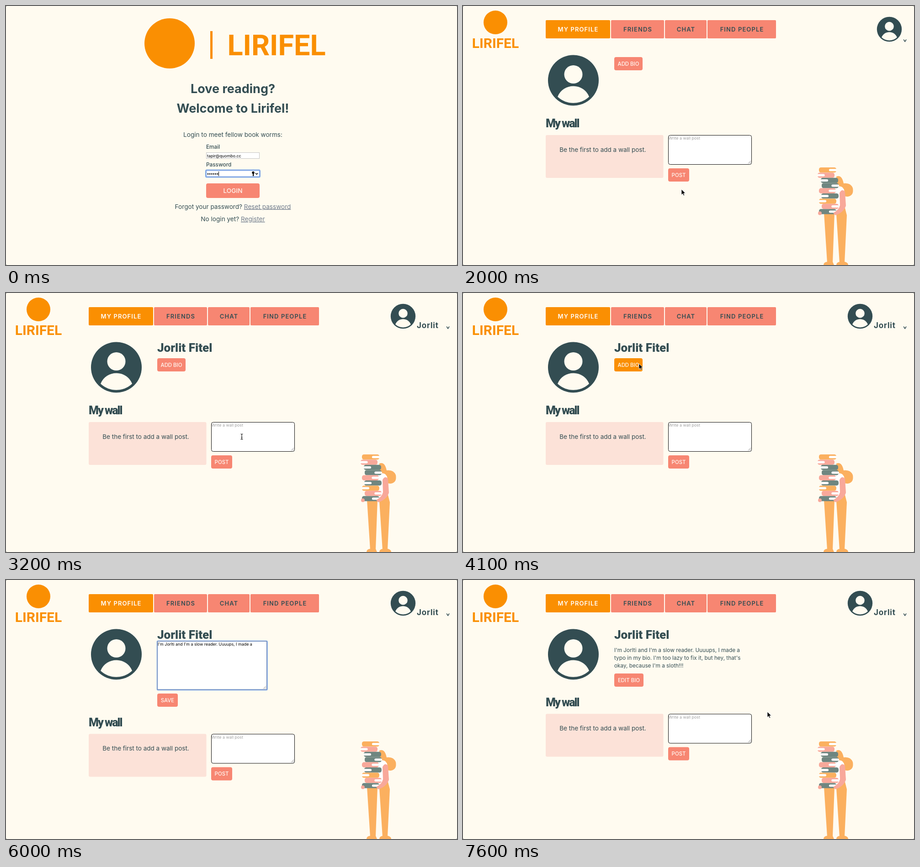
An HTML page that plays this animation: 987x568 px, repeating every 7.7 s.

```html
<!DOCTYPE html>
<html lang="en">
<head>
<meta charset="utf-8">
<title>Lirifel</title>
<style>
  html, body { margin: 0; width: 100%; height: 100%; overflow: hidden; background: #555; }
  svg { display: block; width: 987px; height: 568px; font: 13.6px Inter, sans-serif; fill: #334d52; }
  text { white-space: pre; }
  .mid { text-anchor: middle; }
  .brand { font-family: Roboto, sans-serif; font-weight: 700; fill: #fa8f02; text-anchor: middle; }
  .head { font: 900 26px Roboto, sans-serif; }
  .title { font-weight: 700; font-size: 27px; }
  .label { font-weight: 500; font-size: 11.8px; }
  .field { font-size: 8.9px; fill: #000; }
  .hint { font-size: 8.9px; fill: #a0a0a0; }
  .nav { font-weight: 600; font-size: 13px; letter-spacing: 1.1px; }
  .bio { font-size: 11.8px; }
  .link { fill: #717d8d; text-decoration: underline; }
</style>
</head>
<body>
<svg id="stage" viewBox="0 0 987 568"></svg>
<script>
const LOOP = 7700, STEP = 100;
const CREAM = '#fffbf0', DARK = '#334d52', CORAL = '#f78672', ORANGE = '#fa8f02', GREY = '#717e90';
const SAND = '#fbb05f', PINK = '#f8a89a', SLATE = '#6f8680', RING = '#82a8e6';
const NAME = 'Jorlit', FULL = 'Jorlit Fitel';
const INTRO = "I'm Jorlti and I'm a slow reader. Uuuups, I made a";
const DRAFT = [INTRO, "typo in my bio. I'm too lazy to fix it, but hey, that's okay,", "because I'm a sloth!!!"];
const BIO = [INTRO, "typo in my bio. I'm too lazy to fix it, but hey, that's", "okay, because I'm a sloth!!!"];

// pointer moves: start, end, from x, y, to x, y
const MOVES = [
  [300, 1000, 664, 60, 478, 402],
  [2800, 3200, 478, 402, 516, 315],
  [3500, 4100, 516, 315, 385, 155],
  [6500, 6800, 385, 155, 364, 265],
  [6800, 7200, 364, 265, 666, 289]
];

const between = (t, a, b) => t >= a && t < b;
const rect = (x, y, w, h, fill, r = 0, more = '') =>
  `<rect x="${x}" y="${y}" width="${w}" height="${h}" rx="${r}" fill="${fill}" ${more}/>`;
const circle = (x, y, r, fill) => `<circle cx="${x}" cy="${y}" r="${r}" fill="${fill}"/>`;
const path = (d, fill, more = '') => `<path d="${d}" fill="${fill}" ${more}/>`;
const line = (d, color, w) => path(d, 'none', `stroke="${color}" stroke-width="${w}"`);
const text = (x, y, s, cls = '', more = '') => `<text x="${x}" y="${y}" class="${cls}" ${more}>${s}</text>`;
const group = (x, y, body, scale = 1) => `<g transform="translate(${x} ${y}) scale(${scale})">${body}</g>`;

function pointer(t) {
  let pos = { x: 664, y: 60 };
  for (const [a, b, x0, y0, x1, y1] of MOVES) {
    if (t < a) break;
    const p = Math.min(1, (t - a) / (b - a)), e = p * p * (3 - 2 * p);
    pos = { x: x0 + (x1 - x0) * e, y: y0 + (y1 - y0) * e };
  }
  pos.hidden = t < 400 || between(t, 5800, 6600);
  return pos;
}

const inside = (p, x, y, w, h) => !p.hidden && p.x >= x && p.x <= x + w && p.y >= y && p.y <= y + h;

function button(p, x, y, w, h, label, size = 11.4, fill = CORAL) {
  const color = inside(p, x, y, w, h) ? ORANGE : fill;
  return rect(x, y, w, h, color, 4) +
    text(x + w / 2, y + h / 2 + size * .37, label, 'mid', `font-size="${size}" font-weight="500" fill="#fff8f2"`);
}

function drawPointer(p, beam) {
  if (p.hidden) return '';
  const body = beam
    ? line('M-2.5-6Q0-6 0-4Q0-6 2.5-6M0-4V4M-2.5 6Q0 6 0 4Q0 6 2.5 6M-1.5 1.5H1.5', '#222', 1.2)
    : path('M0 0V12.2L2.9 9.6 4.8 14 6.8 13.1 4.9 8.8H8.8Z', '#000', 'stroke="#fff" stroke-width=".8"');
  return group(p.x, p.y, body);
}

const grip = (x, y) => line(`M${x - 7} ${y - 1.5}l6-6M${x - 4} ${y - 1.5}l3-3`, '#777', .8);

function login(t, p) {
  const focus = t < 1200;
  let dots = '';
  for (let i = 0; i < 6; i++) dots += circle(442 + i * 4.2, 368.3, 1.4, '#000');
  return circle(358, 82, 55, ORANGE) + rect(447, 55, 5, 61, ORANGE) +
    text(592, 107.5, 'LIRIFEL', 'brand', 'font-size="63"') +
    text(496.5, 191, 'Love reading?', 'title mid') +
    text(496.5, 234, 'Welcome to Lirifel!', 'title mid') +
    text(496.5, 286.5, 'Login to meet fellow book worms:', 'mid') +
    text(438, 312.5, 'Email', 'label') +
    rect(438.5, 321.5, 116, 13, '#fff', 0, 'stroke="#c4c4c4"') +
    text(440, 331.5, 'tapir@quombo.cc', 'field') +
    text(438, 352, 'Password', 'label') +
    (focus
      ? rect(437.5, 360, 118, 15, '#fff', 2, `stroke="${RING}" stroke-width="3"`) +
        line('M465.5 363V373', '#000', 1) +
        circle(541, 365.5, 2.7, '#000') + rect(540, 367, 2.2, 6, '#000') +
        line('M546 366.5l2.6 2.7 2.6-2.7', '#000', 1.4)
      : rect(438.5, 361.5, 116, 13, '#fff', 0, 'stroke="#c4c4c4"')) +
    dots + button(p, 438, 389, 117, 32, 'LOGIN', 13.6) +
    text(496.5, 444.5, 'Forgot your password? <tspan class="link">Reset password</tspan>', 'mid') +
    text(496.5, 472, 'No login yet? <tspan class="link">Register</tspan>', 'mid');
}

const avatar = (x, y, r) => group(x, y,
  circle(0, 0, 55.5, DARK) + circle(0, -13, 20, CREAM) +
  path('M-34.5 36C-22 5 22 5 34.5 36A50 50 0 0 1-34.5 36Z', CREAM), r / 55.5);

function header(named) {
  const tabs = [['MY PROFILE', 181, 141], ['FRIENDS', 324, 116], ['CHAT', 442, 91], ['FIND PEOPLE', 535, 150]];
  return circle(71, 36, 26, ORANGE) + text(71, 91.5, 'LIRIFEL', 'brand', 'font-size="30"') +
    tabs.map(([s, x, w], i) => rect(x, 31, w, 40, i ? CORAL : ORANGE, 2) +
      text(x + w / 2 + .5, 55.7, s, 'nav mid', i ? '' : 'fill="#fff" font-weight="700"')).join('') +
    avatar(named ? 869 : 933, 51, 27.2) +
    (named ? text(899, 77, NAME, '', 'font-size="17" font-weight="700" letter-spacing=".8"') : '') +
    line('M964.3 73.5L967.2 78 970.1 73.5', DARK, 1.5);
}

function book(x, y, w, color, flip) {
  const pages = w * .45;
  return rect(x, y, w, 11.3, color, 4.5) +
    rect(flip ? x - 1 : x + w - pages + 1, y + 3.2, pages, 5, '#fff', 2.5);
}

function reader() {
  const stack = [
    [779, 38, SAND, 0], [776, 37, PINK, 1], [783, 38, SLATE, 1], [785, 37, SLATE, 0], [779, 37, PINK, 0],
    [784, 38, SLATE, 1], [779, 38, SAND, 1], [785, 37, PINK, 0], [779, 38, SLATE, 0]
  ];
  return path('M817 374Q829 369 833 389Q848 387 853 399Q856 416 842 418Q832 419 830 408L817 403Z', SAND) +
    path('M815 397Q832 391 835 407L834 448H815Z', '#fff') +
    path('M790 454H813L809 563H797ZM817 456L823 443H836L840 459 835 563H824Z', SAND) +
    path('M789 568Q789 562 797 561H809L812 568ZM817 568Q817 562 825 561H836Q843 563 843 568Z', SAND) +
    stack.map(([x, w, c, f], i) => book(x, 354 + i * 11.4, w, c, f)).join('') +
    path('M824 410Q829 400 836 407L838 438Q833 453 815 459L810 454Q823 447 825 437Z', PINK) +
    circle(781, 454.5, 4, PINK);
}

function wall(p, dy) {
  const at = { ...p, y: p.y - dy };
  return group(0, dy,
    text(181, 266, 'My wall', 'head', 'style="font-size:25px;letter-spacing:-2px"') +
    rect(181, 283, 257.5, 94, '#fce2d8', 3) +
    text(306, 319.5, 'Be the first to add a wall post.', 'mid', 'font-size="13.5"') +
    rect(449.5, 283.5, 182, 64, '#fff', 4, 'stroke="#111"') +
    text(449.5, 293, 'Write a wall post', 'hint') + grip(631, 347) +
    button(at, 449, 356, 46, 29, 'POST'));
}

function editor(t, p) {
  const focus = between(t, 4600, 6800);
  const total = DRAFT.join('').length;
  let left = t < 5800 ? 0 : Math.min(total, Math.ceil(total * (t - 5700) / 800));
  const empty = !left;
  let body = '';
  DRAFT.forEach((s, i) => {
    body += text(332, 144 + i * 10.5, s.slice(0, Math.max(0, left)), 'field');
    left -= s.length;
  });
  const caret = empty && focus && !between(t, 5200, 5400);
  return (focus
      ? rect(331.5, 134.5, 239.5, 106, '#fff', 1, `stroke="${RING}" stroke-width="3.5"`)
      : '') +
    rect(331.5, 134.5, 239, 105.5, '#fff', 0, `stroke="${focus ? '#6c83ac' : '#858585'}"`) +
    body + grip(570, 240) + (caret ? rect(332, 135, 1, 10, '#000') : '') +
    (empty ? button(p, 331, 249, 62, 29, 'CANCEL', 11.4, GREY) : button(p, 331, 249, 45, 29, 'SAVE'));
}

function profile(t, p) {
  const named = t >= 2300, editing = between(t, 4400, 6900), saved = t >= 6900;
  const dy = editing ? 54.5 : saved ? 10.5 : 0;
  const bio = editing ? editor(t, p)
    : saved ? BIO.map((s, i) => text(331, 157.5 + i * 17, s, 'bio')).join('') + button(p, 331, 205, 64, 29, 'EDIT BIO')
    : button(p, 331, named ? 143 : 112, 62, 29, 'ADD BIO');
  return header(named) + avatar(241.5, 163, 55.5) +
    (named ? text(331, 129, FULL, 'head') : '') + bio + wall(p, dy) + reader();
}

function scene(t) {
  const p = pointer(t), home = t < 2000, editing = between(t, 4400, 6900);
  const dy = editing ? 54.5 : t >= 6900 ? 10.5 : 0;
  const beam = !home && (inside(p, 449, 283 + dy, 183, 65) || (editing && inside(p, 331, 134, 240, 106)));
  return rect(0, 0, 987, 568, CREAM, 2) + (home ? login(t, p) : profile(t, p)) + drawPointer(p, beam);
}

const stage = document.getElementById('stage');
const start = performance.now();
let last = -1;
function tick() {
  const t = Math.floor((performance.now() - start) % LOOP / STEP) * STEP;
  if (t !== last) stage.innerHTML = scene(last = t);
  requestAnimationFrame(tick);
}
tick();
</script>
</body>
</html>
```
